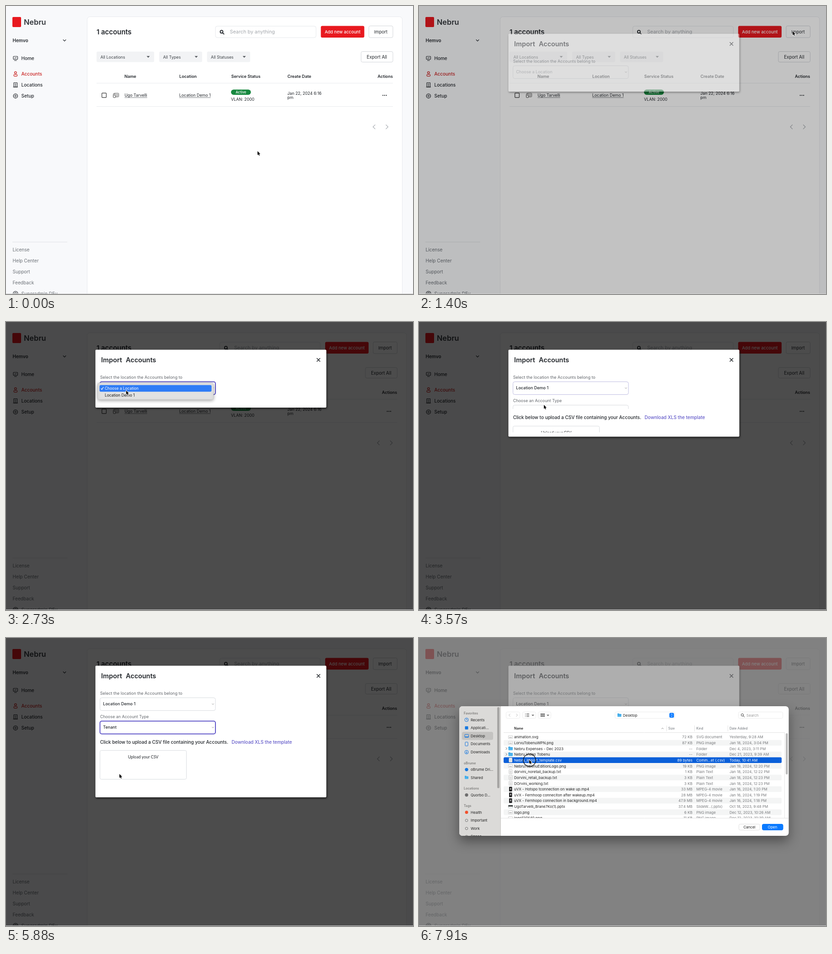
Animation, 890 px wide and 629 px high, one loop 8 s. Source, as an HTML page with a canvas:

```html
<!DOCTYPE html>
<html lang="en">
<head>
<meta charset="utf-8">
<title>Import accounts</title>
<style>
html, body { margin: 0; width: 100%; height: 100%; overflow: hidden; background: #f8f9fb; }
canvas { display: block; }
</style>
</head>
<body>
<canvas id="stage" width="890" height="629"></canvas>
<script>
const W = 890, H = 629, LOOP = 8000, STEP = 70;
const stage = document.getElementById('stage').getContext('2d');
const buffer = document.createElement('canvas');
buffer.width = W;
buffer.height = H;
const layer = buffer.getContext('2d');
let g = stage;

const RED = '#e8191f', INK = '#22262b', GRAY = '#6c7177', BLUE = '#0a7aff', VIOLET = '#6259c9';

const clamp = v => Math.max(0, Math.min(1, v));
const ramp = (t, a, b) => clamp((t - a) / (b - a));
const smooth = p => p * p * (3 - 2 * p);
const mix = (a, b, p) => a + (b - a) * p;
const within = (t, a, b) => t >= a && t < b;

function text(s, x, y, size, color = INK, weight = 400, align = 'left', family = 'Inter') {
  g.font = `${weight} ${size}px ${family}, sans-serif`;
  g.textAlign = align;
  g.fillStyle = color;
  g.fillText(s, x, y + size * 0.36);
}

function box(x, y, w, h, r, fill, stroke, width = 1) {
  g.beginPath();
  g.roundRect(x, y, w, h, r);
  if (fill) { g.fillStyle = fill; g.fill(); }
  if (stroke) { g.strokeStyle = stroke; g.lineWidth = width; g.stroke(); }
}

function line(color, width, ...pts) {
  g.beginPath();
  for (let i = 0; i < pts.length; i += 2) g.lineTo(pts[i], pts[i + 1]);
  g.strokeStyle = color;
  g.lineWidth = width;
  g.stroke();
}

function circle(x, y, r, fill, stroke, width = 1) {
  box(x - r, y - r, 2 * r, 2 * r, r, fill, stroke, width);
}

function chevron(x, y, dx, dy, color, width = 1.2) {
  const side = dx ? [x - dx, y - 2 * Math.abs(dx), x - dx, y + 2 * Math.abs(dx)]
                  : [x - 2 * Math.abs(dy), y - dy, x + 2 * Math.abs(dy), y - dy];
  line(color, width, side[0], side[1], x + dx, y + dy, side[2], side[3]);
}

function caret(x, y) {
  g.beginPath();
  g.moveTo(x - 3.5, y - 1.8);
  g.lineTo(x + 3.5, y - 1.8);
  g.lineTo(x, y + 2);
  g.fillStyle = '#55595e';
  g.fill();
}

function lens(x, y, r, color, width) {
  circle(x, y, r, null, color, width);
  line(color, width, x + r * 0.7, y + r * 0.7, x + r * 1.9, y + r * 1.9);
}

function clipped(x, y, w, h, draw) {
  g.save();
  g.beginPath();
  g.rect(x, y, w, h);
  g.clip();
  draw();
  g.restore();
}

function grouped(alpha, draw) {
  if (alpha <= 0) return;
  if (alpha >= 1) return draw();
  layer.clearRect(0, 0, W, H);
  g = layer;
  draw();
  g = stage;
  g.globalAlpha = alpha;
  g.drawImage(buffer, 0, 0);
  g.globalAlpha = 1;
}

function shadowed(color, blur, dx, dy, draw) {
  g.save();
  g.shadowColor = color;
  g.shadowBlur = blur;
  g.shadowOffsetX = dx;
  g.shadowOffsetY = dy;
  draw();
  g.restore();
}

// ---- page ----
function sidebar() {
  box(14, 24, 19, 22, 2, RED);
  text('Nebru', 39, 35, 16.3, '#33373c', 600);
  text('Hemvo', 14.5, 75, 10, INK, 600);
  chevron(128, 75, 0, 1.6, INK, 1.3);
  [['Home', 114], ['Locations', 172], ['Setup', 196]].forEach(([s, y]) => text(s, 33.5, y, 10, INK, 500));
  text('Accounts', 33.5, 148.3, 10, '#c9201f', 500);

  box(16, 110, 9.5, 6.5, 1, null, INK, 1.1);
  line(INK, 1.1, 18, 119, 23.5, 119);
  line(INK, 1, 18.5, 114.5, 20, 112.8, 21.5, 114, 23, 112);
  circle(20.8, 145.6, 2.3, null, '#c9201f', 1.2);
  box(17, 149.5, 7.6, 3.8, 1.5, null, '#c9201f', 1.2);
  box(17, 167.5, 7.5, 9.5, 0.5, null, INK, 1.1);
  line(INK, 1, 15.5, 177, 26, 177);
  for (const y of [170, 172.5, 175]) line(INK, 1, 19, y, 22.5, y);
  circle(20.8, 196.4, 4.6, null, INK, 1.3);
  circle(20.8, 196.4, 1.6, null, INK, 1.1);

  line('#e0e3e6', 1, 14, 515.5, 134, 515.5);
  ['License', 'Help Center', 'Support', 'Feedback'].forEach((s, i) => text(s, 14.5, 532.5 + 24 * i, 10.1, GRAY));
  circle(20.8, 628, 5, null, INK, 1.1);
  circle(20.8, 627, 1.8, null, INK, 1);
  text('Superadmin DEv', 33.5, 628, 10.1, GRAY);
}

function page(dx) {
  g.fillStyle = '#f8f9fb';
  g.fillRect(0, 0, W, H);
  box(177.5, 23.5, 689 + dx, 640, 6, '#fff', '#e8eaee');
  sidebar();
  text('1 accounts', 198, 56.5, 14.9, INK, 600);

  box(458 + dx, 44, 220, 25, 4, '#fff', '#e6e8eb');
  lens(471.4 + dx, 56.2, 3, INK, 1.8);
  text('Search by anything', 489.5 + dx, 56.5, 10.8, '#a3a7ac');
  box(688.5 + dx, 43.5, 95, 25.5, 3, RED);
  text('Add new account', 736 + dx, 56.5, 9.4, '#fff', 500, 'center');
  box(793.5 + dx, 43.5, 52.5, 25.5, 3, '#fff', '#d3d6da');
  text('Import', 819.5 + dx, 56.5, 9.6, INK, 400, 'center');
  box(776.5 + dx, 99.5, 69.5, 23, 3, '#fff', '#d3d6da');
  text('Export All', 811 + dx, 111.3, 9.8, INK, 400, 'center');

  [[198, 126, 'All Locations'], [335, 94, 'All Types'], [439.5, 94.5, 'All Statuses']].forEach(([x, w, s]) => {
    box(x, 99.5, w, 23, 3, '#f2f3f5');
    text(s, x + 8.5, 111.3, 8.95, '#3c4146');
    caret(x + w - 13, 111);
  });

  [['Name', 259], ['Location', 379], ['Service Status', 492.5], ['Create Date', 615.5], ['Actions', 812.5 + dx]]
    .forEach(([s, x]) => text(s, x, 153.8, 9.1, INK, 600));
  line('#e9ebee', 1, 198, 168.5, 846 + dx, 168.5);
  line('#e9ebee', 1, 198, 219.5, 846 + dx, 219.5);

  box(209.7, 190.2, 9.6, 9.6, 1, '#fff', '#333', 1.2);
  box(235.5, 190.5, 11, 8, 1, null, '#555');
  box(234.5, 192.5, 5, 7.5, 1, '#fff', '#444');
  circle(237, 195, 1, '#444');
  line('#555', 1, 241, 193.5, 245, 193.5);
  line('#555', 1, 241, 196, 245, 196);
  [['Ugo Tarvelli', 259.3], ['Location Demo 1', 378.8]].forEach(([s, x]) => {
    text(s, x, 195.2, 8.8);
    const w = g.measureText(s).width;
    line('#55595e', 0.8, x, 200, x + w, 200);
  });
  box(492, 182.5, 43.5, 11.5, 5.7, '#17883f');
  text('Active', 513.7, 188.3, 7.6, '#fff', 500, 'center');
  text('VLAN: 2000', 492, 203.7, 8.9);
  text('Jan 22, 2024 6:16', 615.3, 191, 8.8);
  text('pm', 615.3, 200, 8.8);
  for (const x of [824.3, 828, 831.7]) circle(x + dx, 195.2, 1.1, INK);
  chevron(805 + dx, 264, -2.4, 0, '#a9adb2', 1.2);
  chevron(833 + dx, 264, 2.4, 0, '#a9adb2', 1.2);
}

// ---- import dialog ----
function select(y, label, color, focus) {
  box(205.5, y + 0.5, 252.5, 28, 4, '#fff', ['#d9dce0', '#bfbde2', VIOLET][focus], focus === 2 ? 2 : 1);
  text(label, 212.3, y + 14, 9, color, color === INK ? 500 : 400);
  chevron(452.5, y + 14.3, 0, 1, '#888', 0.9);
}

function modal(t) {
  const p1 = ramp(t, 3430, 3650), p2 = ramp(t, 3430, 3920);
  const bottom = 187 + 50 * p1 + 111 * p2;
  shadowed('rgba(0,0,0,.75)', 4, 1, 2, () => box(195.5, 60.5, 505, bottom - 60.5, 2, '#fff'));
  text('Import', 208, 82.5, 14.4, INK, 600);
  text('Accounts', 262, 82.5, 14.4, INK, 600);
  line(INK, 1.4, 679.5, 79, 687, 86.5);
  line(INK, 1.4, 687, 79, 679.5, 86.5);
  text('Select the location the Accounts belong to', 205.7, 121.2, 9, '#62666b');
  const chosen = t >= 3430;
  const focus = within(t, 2520, 3430) ? 2 : within(t, 3430, 4060) ? 1 : 0;
  select(130, chosen ? 'Location Demo 1' : 'Choose a Location', chosen ? INK : '#a0a4a9', focus);
  if (!chosen) return;

  const rowY = mix(177, 227, p1);
  clipped(196, 159, 500, 54 * p1 ** 1.25, () => {
    text('Choose an Account Type', 205.7, 172.2, 8.95, '#62666b');
    select(181, 'Tenant', INK, t >= 4060 ? 2 : 0);
  });
  clipped(196, rowY - 10, 500, 28 + 68 * p2 ** 1.25, () => {
    text('Click below to upload a CSV file containing your Accounts.', 205.7, rowY, 10.03, INK, 500);
    text('Download XLS the template', 493.3, rowY, 10.03, VIOLET, 500);
    box(205.5, rowY + 18.5, 189, 63, 3, '#fff', '#d9dce0');
    text('Upload your CSV', 300, rowY + 33, 8.9, INK, 400, 'center', 'Lato');
  });
}

function menu(y, items, hot) {
  shadowed('rgba(0,0,0,.35)', 7, 0, 2, () => box(200.5, y, 253, items.length * 14.5 + 7.5, 4, '#e2e2e2', '#c4c4c4', 0.6));
  items.forEach((s, i) => {
    const cy = y + 12 + 14.5 * i, on = i === hot;
    if (on) box(204.5, cy - 7.2, 245, 14.5, 3, '#2f7cf6');
    if (!i) line(on ? '#fff' : '#111', 1.2, 207.8, cy, 209.6, cy + 2.4, 213.2, cy - 3);
    text(s, 216, cy + 0.3, 8.4, on ? '#fff' : '#111');
  });
}

function menus(t) {
  const blink = (a, row) => within(t, a, a + STEP) ? -1 : row;
  if (within(t, 2590, 3430))
    menu(133, ['Choose a Location', 'Location Demo 1'], blink(3290, t < 2870 ? 0 : 1));
  const fade = ramp(t, 4060, 4200) * (1 - ramp(t, 5040, 5250));
  grouped(fade, () =>
    menu(184.3, ['Tenant', 'Temp. Visitor', 'IoT group', 'Space'], blink(4970, t < 4760 ? 1 : 0)));
}

// ---- file chooser ----
const FILES = [
  ['animation.svg', '72 KB', 'SVG document', 'Yesterday, 9:28 AM'],
  ['LorvuTobenuWPN.png', '87 KB', 'PNG image', 'Jan 18, 2024, 3:04 PM'],
  ['Nebru Expenses - Dec 2023', '--', 'Folder', 'Dec 4, 2023, 3:11 PM'],
  ['Nebru Video Tobenu', '--', 'Folder', 'Dec 21, 2023, 9:39 AM'],
  ['Nebru_import_template.csv', '89 bytes', 'Comm...et (.csv)', 'Today, 10:41 AM'],
  ['NebruTobenuEditionLogo.png', '19 KB', 'PNG image', 'Jan 19, 2024, 12:20 PM'],
  ['dorvini_noretail_backup.txt', '1 KB', 'Plain Text', 'Jan 18, 2024, 12:22 PM'],
  ['Dorvini_retail_backup.txt', '3 KB', 'Plain Text', 'Jan 18, 2024, 12:23 PM'],
  ['DOrvini_working.txt', '3 KB', 'Plain Text', 'Jan 18, 2024, 12:23 PM'],
  ['uVX - Hotspo tconnection on wake up.mp4', '33 MB', 'MPEG-4 movie', 'Jan 16, 2024, 1:20 PM'],
  ['uVX - Fernhoop conneciton after wakeup.mp4', '28 MB', 'MPEG-4 movie', 'Jan 16, 2024, 1:19 PM'],
  ['uVX - Fernhopo connection in background.mp4', '47.9 MB', 'MPEG-4 movie', 'Jan 16, 2024, 1:18 PM'],
  ['UgoTarvelli_Brane7Ko(1).pptx', '37.4 MB', 'SlideW...(.pptx)', 'Oct 18, 2023, 9:48 PM'],
  ['logo.png', '6 KB', 'PNG image', 'Dec 12, 2023, 10:26 AM'],
  ['logo120X40.png', '11 KB', 'PNG image', 'Dec 12, 2023, 10:39 AM']
];

function folder(x, y, w, h) {
  box(x, y - h / 2 - 1, w * 0.45, 3, 0.8, '#2d9be0');
  box(x, y - h / 2, w, h, 1, '#4fb5ee');
  line('#2d9be0', 0.8, x, y - h / 2 + 2, x + w, y - h / 2 + 2);
}

function fileIcon(name, kind, y) {
  if (kind === 'Folder') {
    chevron(191, y, 1.3, 0, '#666', 1);
    folder(195.5, y + 0.3, 9.5, 7);
  } else if (kind.startsWith('MPEG')) {
    box(197, y - 5, 6.5, 10, 0.8, '#1c1c1e');
    box(199, y - 2.5, 2.5, 4, 0.5, '#aaa');
  } else if (/png|svg/.test(name)) {
    box(195.5, y - 3, 9, 6.5, 0.6, '#fff', '#c2c2c2', 0.8);
    line('#8a8a8a', 1, 197, y + 1, 203, y + 1);
  } else if (/pptx/.test(name)) {
    box(195.5, y - 3, 9.5, 6, 0.5, '#fff', '#9aa', 0.8);
    box(195.5, y - 2.5, 9.5, 2.5, 0, '#222');
  } else {
    box(196.8, y - 4.8, 7, 9.4, 0.8, '#fff', '#b8b8b8', 0.8);
    for (const d of [-1.5, 0.5, 2.5]) line('#a5a5a5', 0.7, 198.3, y + d, 202.3, y + d);
  }
}

function fileList(selected) {
  FILES.forEach(([name, size, kind, date], i) => {
    const y = 216.2 + 12.64 * i, on = i === selected;
    if (on || i % 2) box(185, y - 6.2, 608, 12.4, 2.5, on ? '#0a5fd9' : '#f4f5f5');
    const soft = on ? '#fff' : '#77797c';
    fileIcon(name, kind, y);
    text(name, 208, y + 0.3, 8.05, on ? '#fff' : '#222');
    text(size, 598, y + 0.3, 8.05, soft, 400, 'right');
    text(kind, 606.5, y + 0.3, 8, soft);
    text(date, 679, y + 0.3, 8, soft);
  });
}

function places() {
  box(94, 205, 68, 17.5, 3.5, '#c4c3c1');
  [['Favorites', 164], ['oBrume', 273], ['Locations', 328.5], ['Tags', 366.5]]
    .forEach(([s, y]) => text(s, 98, y, 7, '#7d7c7a', 600));
  [['Recents', 178.7], ['Applicati...', 196.3], ['Desktop', 214], ['Documents', 231.6], ['Downloads', 249.3],
   ['oBrume Dri...', 287.3], ['Shared', 305], ['Quorbo D...', 342.8], ['Health', 380.7], ['Important', 398.4],
   ['Work', 416], ['Space', 433.6]].forEach(([s, y]) => text(s, 113, y, 8, '#222'));

  const blue = '#1577e0';
  circle(104, 178.7, 4, null, blue);
  line(blue, 1, 104, 176, 104, 179, 106, 179);
  box(100.5, 192.8, 7, 7, 1, blue);
  box(100, 210.5, 8.5, 6.5, 1, null, blue);
  line(blue, 1.6, 100.5, 216, 108, 216);
  box(101, 227.3, 6, 8.4, 1, null, blue);
  circle(104, 249.3, 4, null, blue);
  line(blue, 1, 104, 246.8, 104, 251.5);
  chevron(104, 250.7, 0, 0.9, blue, 1);
  circle(104, 287.3, 3.6, blue);
  folder(100, 305, 8, 6);
  circle(104, 342.8, 3.6, '#6d6d6d');
  circle(104, 380.7, 3.4, '#f2502c');
  for (const y of [398.4, 416, 433.6]) circle(104, y, 2.8, null, '#6d6d6d', 0.9);
  box(171, 151, 5, 177, 2.5, '#a7a6a4');
}

function toolbar() {
  const edge = '#ececec', dark = '#444';
  box(190.5, 161.5, 30, 14, 3, '#fff', edge);
  chevron(198, 168.5, -1.5, 0, '#b5b5b5', 1);
  chevron(214, 168.5, 1.5, 0, '#b5b5b5', 1);
  box(226.5, 161.5, 29, 14, 3, '#fff', edge);
  for (const y of [165.5, 168.5, 171.5]) {
    line(dark, 1, 232, y, 233.3, y);
    line(dark, 1, 235, y, 241, y);
  }
  chevron(249, 168.5, 0, 1, dark, 1.1);
  box(260.5, 161.5, 28, 14, 3, '#fff', edge);
  for (let i = 0; i < 6; i++) box(266 + 3.2 * (i % 3), i < 3 ? 165 : 169, 2.4, 2.8, 0.4, dark);
  chevron(282, 168.5, 0, 1, dark, 1.1);
  box(428.5, 161.5, 131, 14, 3, '#fff', edge);
  folder(434, 169, 8.5, 6.5);
  text('Desktop', 446, 168.7, 8, '#222');
  box(547.5, 163.5, 10, 10.5, 2.5, BLUE);
  chevron(552.5, 166.8, 0, -0.9, '#fff', 1);
  chevron(552.5, 170.7, 0, 0.9, '#fff', 1);
  box(698.5, 161.5, 97, 14, 3, '#fff', edge);
  lens(707, 168, 2.6, dark, 1);
  text('Search', 716, 168.8, 8, '#9a9a9a');
}

function chooser(selected) {
  shadowed('rgba(0,0,0,.4)', 26, 0, 12, () => box(88, 149, 720.5, 283, 7, '#fff'));
  g.save();
  g.beginPath();
  g.roundRect(88, 149, 720.5, 283, 7);
  g.clip();
  box(88, 149, 90.5, 283, 0, '#dbdad8');
  line('#c9c8c6', 1, 178.5, 149, 178.5, 432);
  places();
  toolbar();
  [['Name', 208, 600, '#222'], ['Size', 545, 400, GRAY], ['Kind', 606.5, 400, GRAY], ['Date Added', 679, 400, GRAY]]
    .forEach(([s, x, weight, color]) => text(s, x, 197.5, 7.1, color, weight));
  chevron(532.5, 197.5, 0, -1.1, '#777', 0.9);
  for (const x of [541.5, 602.5, 675.5]) line('#e3e3e3', 1, x, 191, x, 204);
  line('#e3e3e3', 1, 185, 206.5, 800, 206.5);
  clipped(179, 207, 620, 186, () => fileList(selected));
  line('#e6e6e6', 1, 799.5, 207, 799.5, 393);
  box(802, 208, 4.5, 90, 2.2, '#bdbdbd');
  line('#e3e3e3', 1, 179, 393.5, 808, 393.5);
  const ready = selected >= 0;
  box(699.5, 406.5, 46, 13, 3, '#fff', '#dedede');
  text('Cancel', 722.5, 412.8, 8, '#222', 400, 'center');
  box(750.5, 406.5, 45.5, 13, 3, ready ? BLUE : '#fff', ready ? BLUE : '#ededed');
  text('Open', 773, 412.8, 8, ready ? '#fff' : '#b9b9b9', 400, 'center');
  g.restore();
}

// ---- pointer ----
const PATH = [
  [0, 550, 317], [140, 528, 275], [280, 507, 160], [420, 590, 35], [560, 730, 1], [680, 836, 25], [770, 817, 55],
  [1820, 817, 55], [1960, 770, 64], [2170, 480, 115], [2310, 290, 142], [2450, 262, 146],
  [2660, 262, 146], [2940, 265, 161], [3430, 265, 161], [3570, 273, 181], [3710, 262, 198], [3920, 250, 205],
  [4620, 250, 205], [4830, 247, 196], [5180, 247, 196], [5390, 246, 235], [5740, 248, 297],
  [6230, 248, 297], [6370, 248, 309.5], [6580, 243, 269], [6860, 238, 276],
  [7210, 238, 276], [7350, 236, 273], [7420, 236, 273], [7700, 241, 266], [8000, 241, 266]
];
const CLICKS = [[910, 1190], [2450, 2590], [3150, 3290], [4060, 4130], [4830, 4970], [5740, 5880], [7000, 7140], [7840, 8000]];

function pointer(t) {
  const i = PATH.findIndex(k => k[0] > t);
  const [t0, x0, y0] = PATH[i - 1], [t1, x1, y1] = PATH[i];
  const p = ramp(t, t0, t1), x = mix(x0, x1, p), y = mix(y0, y1, p);
  if (CLICKS.some(([a, b]) => within(t, a, b))) circle(x + 0.7, y + 1, 13.6, null, '#111', 1.3);
  g.beginPath();
  [[0, 0], [0, 8.6], [2, 6.9], [3.3, 9.8], [4.8, 9.2], [3.5, 6.3], [6, 6.1]].forEach(([a, b]) => g.lineTo(x + a, y + b));
  g.closePath();
  g.lineJoin = 'round';
  g.strokeStyle = '#fff';
  g.lineWidth = 1.6;
  g.stroke();
  g.fillStyle = '#000';
  g.fill();
  g.lineJoin = 'miter';
}

function draw(t) {
  const open = ramp(t, 5950, 6300);
  const dim = smooth(ramp(t, 1270, 1600)) * mix(0.7, 0.45, open);
  page(t >= 1190 ? 9.4 : 0);
  g.fillStyle = `rgba(0,0,0,${dim})`;
  g.fillRect(0, 0, W, H);
  grouped(ramp(t, 1260, 1560), () => modal(t));
  menus(t);
  if (open) {
    g.fillStyle = `rgba(125,125,125,${0.62 * open})`;
    g.fillRect(0, 0, W, H);
    grouped(open, () => chooser(t >= 7840 ? 4 : t >= 7000 ? 5 : -1));
  }
  line('#cfcfcf', 1, 0, 628.5, W, 628.5);
  pointer(t);
}

const start = performance.now();
function tick() {
  const t = (performance.now() - start) % LOOP;
  draw(Math.min(7910, Math.floor(t / STEP) * STEP));
  requestAnimationFrame(tick);
}
tick();
</script>
</body>
</html>
```
